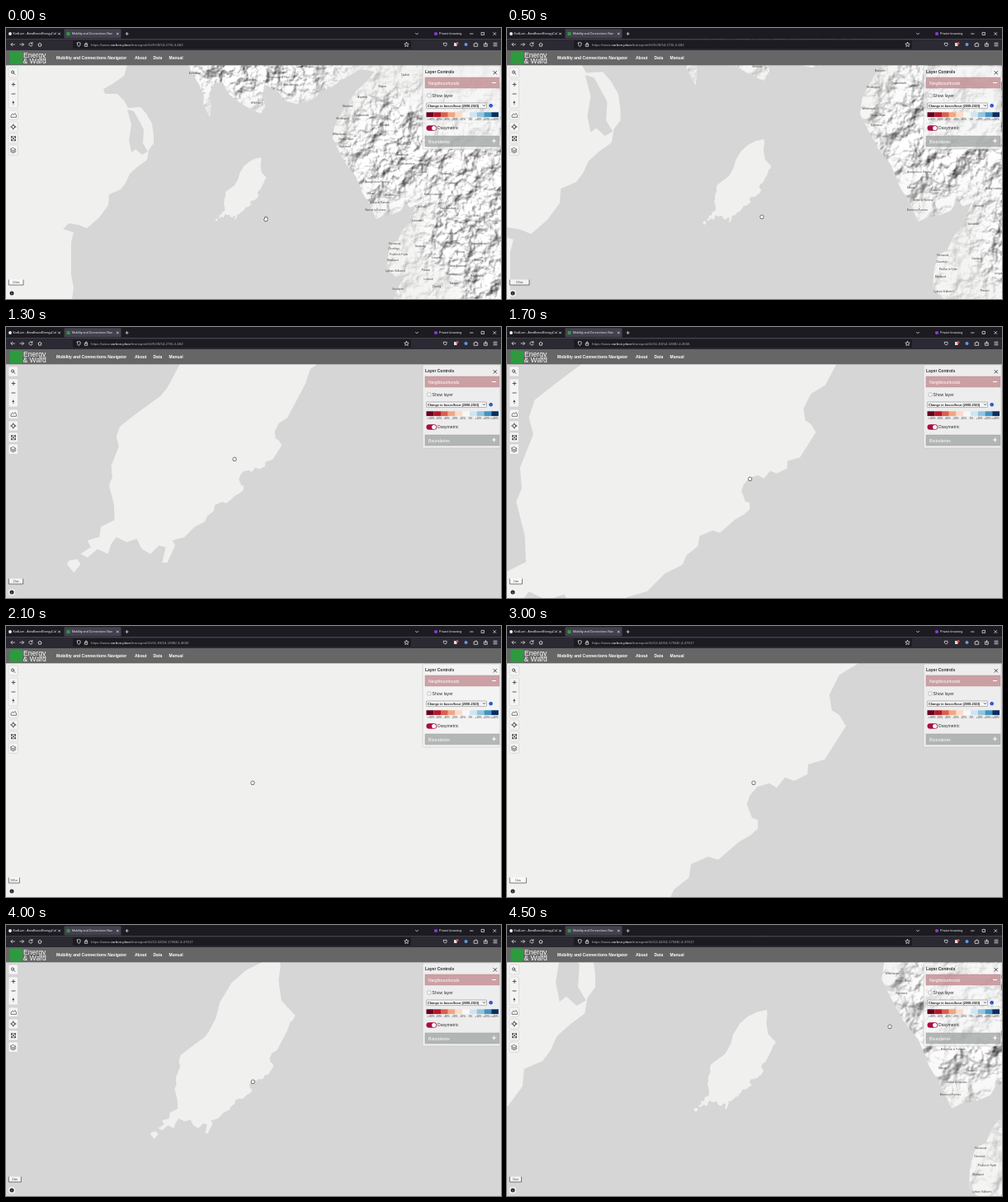
An HTML page for the animation above (4.6 s loop, 600 px wide and 329 px high).

```html
<!DOCTYPE html>
<html lang="en">
<head>
<meta charset="utf-8">
<title>Map explorer</title>
<style>
html, body { margin: 0; width: 100%; height: 100%; overflow: hidden; background: #d6d6d6; }
svg { display: block; width: 100vw; height: 100vh; }
text { font-family: "Liberation Sans", Arial, sans-serif; white-space: pre; }
.b { font-weight: bold; }
.ui { font-family: "Open Sans", "Noto Sans", sans-serif; }
.line { fill: none; stroke-width: .8; stroke-linecap: round; stroke-linejoin: round; }
.mid { text-anchor: middle; }
</style>
</head>
<body>
<svg viewBox="0 0 600 329" preserveAspectRatio="none">
  <defs>
    <clipPath id="coast"><path id="britain" d="M222 45L225 55 234 68 240 83 239 94 247 108 249 95 246 80 253 66 263 67 271 81 284 91 297 99 309 104 314 95 310 80 316 69 323 74 331 78 337 88 352 92 372 87 382 77 396 71 412 60 430 50 447 53 436 66 425 76 415 90 404 108 398 120 396 134 403 148 412 165 424 180 432 200 441 215 449 232 457 228 468 226 478 222 484 213 490 218 498 214 492 226 485 240 479 248 475 258 467 262 463 275 462 292 472 302 484 299 478 310 472 322 470 329H600V45Z"/></clipPath>
    <filter id="relief" filterUnits="userSpaceOnUse" x="215" y="45" width="385" height="284" color-interpolation-filters="sRGB">
      <feTurbulence type="fractalNoise" baseFrequency=".055" numOctaves="4" seed="4"/>
      <feDiffuseLighting surfaceScale="6" diffuseConstant="1.08" lighting-color="#fff"><feDistantLight azimuth="225" elevation="60"/></feDiffuseLighting>
    </filter>
    <radialGradient id="fade"><stop offset=".45" stop-color="#fff"/><stop offset="1" stop-color="#fff" stop-opacity="0"/></radialGradient>
    <mask id="uplands" maskUnits="userSpaceOnUse" x="215" y="45" width="385" height="284"></mask>
  </defs>
  <rect id="sea" width="600" height="329" fill="#d6d6d6"/>
  <g id="land" fill="#f0f0ef">
    <use href="#britain"/>
    <g id="hills" clip-path="url(#coast)"><g mask="url(#uplands)"><rect x="215" y="45" width="385" height="284" filter="url(#relief)"/></g></g>
    <path d="M0 45H147L143 58 129 68 118 74 120 80 135 80 143 88 148 97 163 96 170 104 177 116 179 130 179 140 173 148 171 160 160 168 150 177 145 188 139 196 125 202 124 215 113 230 104 238 98 243 88 239 76 237 69 244 82 248 79 260 79 300 82 315 80 329H0Z"/>
    <path fill="#d6d6d6" d="M147 99L155 101 161 112 167 123 166 140 172 150 165 154 157 147 152 151 149 136 152 118Z"/>
    <g transform="translate(175 129) scale(.42)">
      <path d="M319 67L320 75 318 90 321 110 328 118 335 125 333 130 330 132 327 141 316.4 161 311.5 164 309 169 309.6 173 311.5 174.2 313.2 177 307.8 185.5 303.6 186.8 303.4 189.3 300 191 297.7 190.1 295.6 192.7 293.7 191.6 290.6 192.5 288.7 194.8 288 197 289.3 200.4 290.8 201 290.8 203.1 289 204.8 286 206.5 280.7 211.1 278.2 210.3 273.8 212.2 273.2 215.7 269.4 218.7 268 222 262 225 256 231 249 233 250.5 236 246 246 243 246 245 237 241 236 236 241 231 238 228 232 222 234 216 231 213 235 211 241 205 238 199 243 195 241 201 237 199 233 206 231 207 225 215 221 214.6 212 211.7 200.5 213.6 196 213 189 217.5 177.7 216 172 218 166 225 160.5 231 156 242 148 246 143 254 128 258 112 270 92 285 79 301 71Z"/>
      <path d="M187 247L188 245 193 244 195 247 191 252Z"/>
    </g>
  </g>
  <g id="labels" class="mid ui" fill="#444" font-size="3.1"></g>

  <!-- map buttons -->
  <g id="buttons" fill="#f4f4f4" stroke="#c4c4c4" stroke-width=".5"></g>
  <g class="line" stroke="#333">
    <circle cx="8" cy="53.5" r="1.6"/><path d="M9.3 54.8L10.8 56.4M7 68.5h4M9 66.5v4M7 80h4"/>
    <path d="M6 108V106l2-2 1.4 1.5 1.5-2 1.6 2.5v2z" stroke-width=".6"/>
    <circle cx="8.8" cy="120" r="2"/><path d="M8.8 116.8v1.2M8.8 122v1.2M5.6 120h1.2M10.8 120h1.2"/>
    <path d="M6.5 133.5v-1.8h1.8M9.7 131.7h1.8v1.8M11.5 135v1.8h-1.8M8.3 136.8h-1.8v-1.8M6.5 131.7l5 5.1M11.5 131.7l-5 5.1"/>
    <path d="M8.7 145.6l3.2 1.7-3.2 1.7-3.2-1.7zM5.5 148.7l3.2 1.7 3.2-1.7M5.5 150.2l3.2 1.7 3.2-1.7" stroke-width=".6"/>
  </g>
  <path d="M8.8 88.3l1.3 2.7h-2.6z" fill="#333"/><path d="M8.8 94l1.3-2.7h-2.6z" fill="#aaa"/>
  <path id="bar" fill="#fff" fill-opacity=".7" stroke="#444" stroke-width=".7"/>
  <text id="dist" class="mid" y="309.6" font-size="3.1" fill="#333"></text>
  <circle cx="7" cy="322" r="4" fill="#f4f4f4"/><circle cx="7" cy="322" r="2.5" fill="#222"/>
  <path d="M7 321.7v1.7M7 320.4v.4" stroke="#fff" stroke-width=".6"/>

  <!-- layer panel -->
  <rect x="505" y="46" width="94" height="101" rx="1.5" fill="#f5f5f5" fill-opacity=".75" stroke="#bbb" stroke-width=".5"/>
  <text class="b" x="508" y="54.5" font-size="5" fill="#333">Layer Controls</text>
  <path class="line" d="M591 52.5l3.6 3.6M594.6 52.5l-3.6 3.6" stroke="#222"/>
  <rect x="508" y="60" width="90" height="13" fill="#c48f94" fill-opacity=".82" stroke="#b98085" stroke-width=".4"/>
  <rect x="508" y="131" width="90" height="13" fill="#9ea3a2" fill-opacity=".75" stroke="#999" stroke-width=".4"/>
  <g fill="#fff" font-size="5.1"><text x="512" y="68.5">Neighbourhoods</text><text x="512" y="139.5">Boundaries</text></g>
  <path d="M589 66.5h5M589 137h5M591.5 134.5v5" stroke="#fff"/>
  <rect x="511" y="80" width="4" height="4" rx=".6" fill="#fff" stroke="#888" stroke-width=".5"/>
  <g fill="#333" font-size="5.1"><text x="516.5" y="84">Show layer</text><text x="523" y="123.3">Dasymetric</text></g>
  <rect x="509.5" y="91" width="73" height="6.6" rx=".8" fill="#f5f5f5" stroke="#777" stroke-width=".5"/>
  <text class="b" x="511" y="95.7" font-size="3.85" fill="#222">Change in buses/hour (2008-2023)</text>
  <path class="line" d="M578.3 93.6l1.2 1.3 1.2-1.3" stroke="#333" stroke-width=".6"/>
  <circle cx="587.7" cy="94.2" r="2.2" fill="#1744cf"/><path d="M587.7 93.9v1.5M587.7 92.7v.4" stroke="#fff" stroke-width=".5"/>
  <g id="ramp"></g>
  <rect x="509.5" y="118.3" width="12.6" height="6.5" rx="3.25" fill="#a80f3e"/><circle cx="518.7" cy="121.55" r="2.6" fill="#fff"/>

  <!-- site header -->
  <rect y="27" width="600" height="18.3" fill="#666"/>
  <rect x="4.5" y="28.5" width="15.5" height="15.5" rx="1.5" fill="#2e9a3f"/>
  <g fill="#fff" font-size="8.6"><text x="21" y="35.6">Energy</text><text x="20.5" y="43.4">&amp; Ward</text></g>
  <g class="b" fill="#fff" font-size="5"><text x="61" y="38">Mobility and Connections Navigator</text><text x="156" y="38">About</text><text x="178.5" y="38">Data</text><text x="197.5" y="38">Manual</text></g>

  <!-- browser -->
  <rect width="600" height="13.5" fill="#1c1b22"/><rect y="13.3" width="600" height="13.7" fill="#2b2a33"/>
  <rect x="70.5" y="1.2" width="69" height="11.3" rx="1.2" fill="#42414d"/>
  <rect x="81" y="15" width="410" height="10.3" rx="1.2" fill="#1c1b22"/>
  <circle cx="5" cy="7" r="1.9" fill="#f4f4f4"/><rect x="73.5" y="5" width="4" height="4" fill="#2e9a3f"/>
  <g class="ui" fill="#f0f0f4" font-size="3.7">
    <text x="8.5" y="8.3">KodLum - AreaBasedEnergyCal</text><text x="80" y="8.3">Mobility and Connections Nav</text>
    <text x="525" y="8.3">Private browsing</text>
    <text x="103" y="21.6" font-size="4.4" fill="#aaa">https://www.<tspan fill="#f0f0f4">carbon.place</tspan>/transport/#/#<tspan id="hash"></tspan></text>
  </g>
  <circle cx="521" cy="7" r="2.1" fill="#8c3ad8"/>
  <g class="line" stroke="#ddd" stroke-width=".6">
    <path d="M63.5 6l2 2M65.5 6l-2 2M134.3 6l2 2M136.3 6l-2 2M145 7h3.2M146.6 5.4v3.2M496.5 6.3l1.5 1.5 1.5-1.5M562.5 7h3.5M576.5 5.4h3v3h-3zM590.8 5.5l3 3M593.8 5.5l-3 3"/>
    <path d="M10.4 20h-4.5l1.8-1.8M5.9 20l1.8 1.8M17 20h4.5l-1.8-1.8M21.5 20l-1.8 1.8M31.7 18.6a2.1 2.1 0 1 0 .4 2M32 17.5v1.5h-1.5M38.8 20l2.2-2 2.2 2M39.6 19.6v2.6h2.8v-2.6"/>
    <path d="M86.4 18.2l1.9-.7 1.9.7c0 2.5-.7 3.7-1.9 4.5-1.2-.8-1.9-2-1.9-4.5zM95.7 19.8h3v2.5h-3zM96.3 19.8v-1a.9.9 0 0 1 1.8 0v1"/>
    <path d="M485.5 17.4l.8 1.7 1.9.2-1.4 1.3.4 1.9-1.7-1-1.7 1 .4-1.9-1.4-1.3 1.9-.2z"/>
    <path d="M530.5 18.3h3.6v2c0 2-3.6 2-3.6 0zM567.5 19h1.5v-1h1.2v1h1.5v3.3h-4.2zM579.8 19h3.5v3.3h-3.5zM581.5 20.5v-3M591 18.2h4M591 20h4M591 21.8h4"/>
  </g>
  <rect x="543" y="18" width="3.5" height="4" fill="#ddd"/><circle cx="547" cy="18.5" r="1.5" fill="#e34850"/>
  <circle cx="557.5" cy="20" r="2" fill="#5b9ee8"/>

  <path id="cursor" fill="#fff" stroke="#222" stroke-width=".6" stroke-linejoin="round"/>
</svg>
<script>
const $ = id => document.getElementById(id);
const LOOP = 4600;
const BASE = .42; // island scale at the widest view

// [ms, scale, x, y]: view of the island
const views = [
  [0, BASE, 175, 129], [350, BASE, 175, 129], [800, 1, 0, 0], [1300, 2.06, -311, -221],
  [2100, 6.2, -1498, -997], [2400, 6.6, -1614, -1074], [2500, 6.6, -1614, -1074],
  [3000, 4.77, -1083, -723], [3600, 1.87, -243, -168], [4500, .672, 100.6, 58]
];
const pointer = [
  [0, 315, 232], [400, 315, 232], [800, 291, 220], [1300, 277, 160],
  [1800, 299, 190], [4000, 299, 190], [4500, 464, 123]
];
const hashes = [[2700, "12.44/54.17946/-4.47617"], [1500, "11.83/54.1698/-4.4656"], [0, "9.09/54.278/-4.482"]];

function add(parent, tag, attrs, text = "") {
  const el = document.createElementNS("http://www.w3.org/2000/svg", tag);
  for (const k in attrs) el.setAttribute(k, attrs[k]);
  el.textContent = text;
  $(parent).append(el);
  return el;
}

const places = `Kirkcowan 229 56,Castle Douglas 362 48,Gatehouse of Fleet 331 61,Wigtown 297 64,
Kirkcudbright 345 70,Whithorn 303 92,Carlisle 484 58,Wigton 456 72,Aspatria 432 85,Maryport 414 96,
Cockermouth 431 107,Workington 408 111,Keswick 459 119,Penrith 503 111,Whitehaven 404 130,
Cleator Moor 412 136,Egremont 411 145,Ambleside 481 155,Windermere 487 166,Kendal 505 176,
Sedbergh 533 178,Broughton in Furness 450 188,Millom 442 202,Ulverston 464 204,Dalton in Furness 453 213,
Barrow in Furness 448 222,Kirkby Lonsdale 518 203,Carnforth 503 218,High Bentham 536 220,Lancaster 499 235,
Settle 570 229,Fleetwood 471 263,Cleveleys 470 269,Garstang 502 266,Barnoldswick 573 263,Poulton le Fylde 476 276,
Blackpool 469 283,Longridge 523 280,Clitheroe 550 273,Great Harwood 547 290,Burnley 573 283,Preston 509 295,
Lytham St Anne's 472 296,Blackburn 541 300,Leyland 512 306,Darwen 543 311,Chorley 522 315,Rawtenstall 571 302,
Southport 475 318`.split(/,\s*/).map(s => {
  const [, name, x, y] = s.match(/(.*) (\d+) (\d+)/);
  return { el: add("labels", "text", {}, name), x: +x, y: +y };
});

// Relief is faint in the lowlands and full in these ellipses
add("uplands", "rect", { x: 215, y: 45, width: 385, height: 284, fill: "#fff", "fill-opacity": .25 });
for (const [cx, cy, rx, ry] of [[470, 148, 75, 85], [570, 170, 80, 130], [550, 255, 60, 55], [310, 52, 115, 45], [590, 310, 55, 45]])
  add("uplands", "ellipse", { cx, cy, rx, ry, fill: "url(#fade)" });

for (const [y, h] of [[48, 12], [63, 34], [100, 11.5], [114, 12], [128, 12], [142, 12.5]])
  add("buttons", "rect", { x: 3, y, width: 11.5, height: h, rx: 1.5 });

const shades = "#67001f #b2182b #d6604d #f4a582 #fddbc7 #f7f7f7 #d1e5f0 #92c5de #4393c3 #053061".split(" ");
const steps = "<-80% -60% -40% -20% -10% 0% +10% +20% >+40%".split(" ");
shades.forEach((fill, i) => add("ramp", "rect", { x: 509.5 + i * 8.75, y: 102.3, width: 8.75, height: 5.8, fill }));
steps.forEach((s, i) => add("ramp", "text", { x: 515 + i * 9.6, y: 112.3, "font-size": 3.1, class: "mid", fill: "#333" }, s));

function span(keys, t) {
  let i = 0;
  while (i < keys.length - 2 && t >= keys[i + 1][0]) i++;
  const a = keys[i], b = keys[i + 1];
  return [a, b, Math.min(1, (t - a[0]) / (b[0] - a[0]))];
}
const mix = (a, b, p) => a + (b - a) * p;

// Zooming is even in log scale and keeps one point of the map fixed
function view(t) {
  const [a, b, p] = span(views, t);
  const s = a[1] * (b[1] / a[1]) ** p;
  const q = a[1] === b[1] ? 0 : (s - a[1]) / (b[1] - a[1]);
  return [s, mix(a[2], b[2], q), mix(a[3], b[3], q)];
}

function scaleBar(s) {
  const perKm = 4.22 * s;
  const km = [10, 5, 3, 2, 1, .5, .3].find(d => d * perKm <= 25);
  const w = km * perKm;
  $("bar").setAttribute("d", `M3.3 305.5v6.5h${w}v-6.5`);
  $("dist").setAttribute("x", 3.3 + w / 2);
  $("dist").textContent = km < 1 ? km * 1000 + " m" : km + " km";
}

function draw(t) {
  const [s, tx, ty] = view(t);
  const k = s / BASE, x = tx - 175 * k, y = ty - 129 * k;
  $("land").setAttribute("transform", `translate(${x} ${y}) scale(${k})`);
  $("hills").setAttribute("display", k < 2.3 ? "inline" : "none");
  // Water tiles are missing at the deepest zoom
  const bare = t >= 2000 && t < 2700;
  $("sea").setAttribute("fill", bare ? "#f0f0ef" : "#d6d6d6");
  $("land").setAttribute("visibility", bare ? "hidden" : "visible");
  for (const p of places) {
    p.el.setAttribute("x", p.x * k + x);
    p.el.setAttribute("y", p.y * k + y);
  }
  scaleBar(s);
  $("hash").textContent = hashes.find(h => t >= h[0])[1];
  const [a, b, p] = span(pointer, t);
  $("cursor").setAttribute("transform", `translate(${mix(a[1], b[1], p)} ${mix(a[2], b[2], p)})`);
  $("cursor").setAttribute("d", t < 100
    ? "M-1.5 2.5L-2.6 .3-1.5-.2V-2.2h.9V-2.7h.9V-2.3h.9V-1.7h.9V1L1.3 2.7z"
    : "M-1.5 2.5L-2.2 .4-1.7-1.2-.7-1.8.9-1.7 2-1V1L1.3 2.6z");
}

const start = performance.now();
function tick(now) {
  draw(Math.max(0, now - start) % LOOP);
  requestAnimationFrame(tick);
}
draw(0);
requestAnimationFrame(tick);
</script>
</body>
</html>
```
